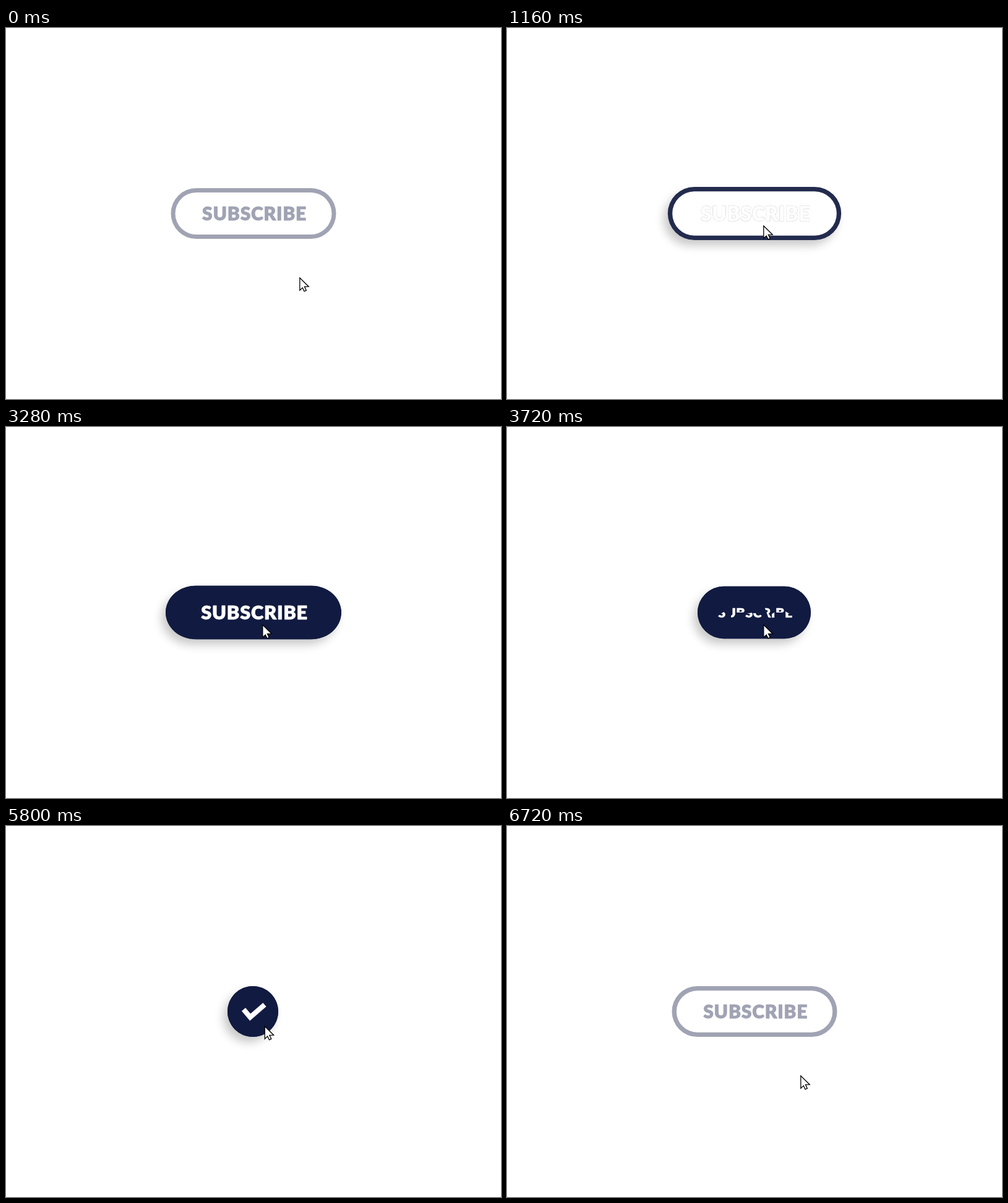
An HTML page with a canvas for the animation above (8640 ms loop, 800 px wide and 600 px high).

```html
<!DOCTYPE html>
<html lang="en">
<head>
<meta charset="utf-8">
<title>Subscribe button</title>
<style>
  html, body { margin: 0; width: 100%; height: 100%; overflow: hidden; background: #fff; }
  canvas { display: block; }
</style>
</head>
<body>
<canvas id="stage" width="800" height="600"></canvas>
<script>
const ctx = document.getElementById('stage').getContext('2d');
const LOOP = 8640, STEP = 40;
const NAVY = [17, 26, 64];
const LABEL = 'SUBSCRIBE';
const FONT = '900 30px Lato, sans-serif';
const SPACING = 0.8;
// Direction, in degrees, in which the remaining part of each letter lies
const CUTS = [55, 0, -90, 80, 90, -20, 60, -90, 120];
const HOME = [474, 403], TARGET = [414, 319];

const mix = (a, b, k) => a + (b - a) * k;
const ramp = (t, from, to) => Math.min(1, Math.max(0, (t - from) / (to - from)));
const tone = k => `rgb(${NAVY.map(v => Math.round(mix(255, v, k))).join()})`;

function polygon(points) {
  ctx.beginPath();
  points.forEach(([x, y]) => ctx.lineTo(x, y));
  ctx.closePath();
}

function pill(cx, hw, hh, rx) {
  const flat = hw - rx;
  ctx.moveTo(cx + flat, 300 + hh);
  ctx.ellipse(cx + flat, 300, rx, hh, 0, Math.PI / 2, -Math.PI / 2, true);
  ctx.ellipse(cx - flat, 300, rx, hh, 0, -Math.PI / 2, Math.PI / 2, true);
  ctx.closePath();
}

// The first part of the outline, counterclockwise from the lower right
function trimmedPill(cx, hw, hh, rx, part) {
  const flat = hw - rx, arc = Math.PI * (rx + hh) / 2;
  const total = 2 * (arc + 2 * flat), points = [];
  for (let i = 0; i <= 240; i++) {
    let d = total * part * i / 240, side = 1;
    if (d > total / 2) { d -= total / 2; side = -1; }
    const a = Math.PI / 2 - Math.PI * Math.min(1, d / arc);
    const x = flat + rx * Math.cos(a) - Math.max(0, d - arc);
    points.push([cx + side * x, 300 + side * hh * Math.sin(a)]);
  }
  polygon(points);
}

function drawLabel(x, scale, color, weight, trim = 0) {
  ctx.save();
  ctx.translate(x, 300.6);
  ctx.scale(scale, scale);
  ctx.font = FONT;
  ctx.fillStyle = ctx.strokeStyle = color;
  ctx.lineWidth = weight;
  ctx.lineJoin = 'round';
  const full = ctx.measureText(LABEL).width + SPACING * (LABEL.length - 1);
  [...LABEL].forEach((letter, i) => {
    const w = ctx.measureText(letter).width;
    const left = ctx.measureText(LABEL.slice(0, i + 1)).width - w + SPACING * i - full / 2;
    ctx.save();
    if (trim > 0) {
      const angle = CUTS[i] * Math.PI / 180;
      ctx.translate(left + w / 2, 0);
      ctx.rotate(angle);
      ctx.beginPath();
      ctx.rect(mix(-16, 16, trim), -40, 80, 80);
      ctx.rotate(-angle);
      ctx.translate(-left - w / 2, 0);
      ctx.clip();
    }
    ctx.fillText(letter, left, 10.6);
    ctx.strokeText(letter, left, 10.6);
    ctx.restore();
  });
  ctx.restore();
}

function drawCheck(part) {
  const bend = 0.34;
  const first = Math.min(1, part / bend), second = ramp(part, bend, 1);
  ctx.beginPath();
  ctx.moveTo(384, 296.6);
  ctx.lineTo(mix(384, 394.6, first), mix(296.6, 309.2, first));
  if (second > 0) ctx.lineTo(mix(394.6, 418, second), mix(309.2, 289, second));
  ctx.strokeStyle = '#fff';
  ctx.lineWidth = 8;
  ctx.lineJoin = 'miter';
  ctx.stroke();
}

function drawCursor(t) {
  const leaving = t >= 5760;
  const u = leaving ? ramp(t, 5760, 6680) : ramp(t, 0, 1040);
  const [from, to] = leaving ? [TARGET, HOME] : [HOME, TARGET];
  const x = mix(from[0], to[0], 1 - (1 - u) ** 1.33);
  const y = mix(from[1], to[1], 1 - (1 - u) ** 1.1);
  ctx.save();
  ctx.translate(x, y);
  polygon([[0.8, 1], [0.8, 21.3], [5.2, 17], [8, 22.8], [11.3, 21.4], [8.4, 15.3], [15.2, 15.2]]);
  ctx.fillStyle = '#fff';
  ctx.fill();
  ctx.strokeStyle = '#000';
  ctx.lineWidth = 1.3;
  ctx.lineJoin = 'miter';
  ctx.stroke();
  ctx.restore();
}

function draw(t) {
  const hover = ramp(t, 880, 1160);
  const widen = ramp(t, 1160, 1760);
  const filled = ramp(t, 1120, 1920) ** 2.2;
  const shrink = ramp(t, 3240, 4160);
  const reset = ramp(t, 6440, 6720);
  const scale = 1 + 0.05 * hover;

  const hw = mix(mix(133.5 * scale + 6.3 * widen, 41, shrink), 133.5, reset);
  const hh = mix(41 * scale + 0.4 * widen, 41, shrink);
  const rx = Math.min(hw, mix(41 * scale + 6.4 * widen, 41, Math.min(1, shrink * 1.6)));
  const cx = 400 - shrink + reset;
  const ink = mix(mix(0.4, 1, ramp(t, 880, 1200)), 0.4, reset);

  ctx.fillStyle = '#fff';
  ctx.fillRect(0, 0, 800, 600);

  ctx.save();
  ctx.shadowColor = `rgba(0,0,0,${0.22 * hover * (1 - reset)})`;
  ctx.shadowOffsetX = -7;
  ctx.shadowOffsetY = 9;
  ctx.shadowBlur = 15;
  ctx.beginPath();
  pill(cx, hw - 0.5, hh - 0.5, rx - 0.5);
  ctx.fill();
  ctx.restore();

  if (filled > 0 && reset < 1) {
    trimmedPill(cx, hw, hh, rx, filled);
    ctx.fillStyle = tone(1 - reset);
    ctx.fill();
  }

  const border = 7 * scale;
  ctx.beginPath();
  pill(cx, hw, hh, rx);
  pill(cx, hw - border, hh - border, rx - border);
  ctx.fillStyle = tone(ink);
  ctx.fill('evenodd');

  if (reset > 0) {
    ctx.globalAlpha = reset;
    drawLabel(401.3, mix(0.6, 1, reset), tone(0.4), 0.8);
    ctx.globalAlpha = 1;
  } else if (shrink < 1) {
    if (hover > 0 && filled < 1) drawLabel(401.2, scale, tone(0.4 * (1 - filled)), 1.1);
    drawLabel(401.2, mix(scale, 0.404, shrink), tone(0.4 * (1 - hover)), 0.8, shrink);
  }

  const check = ramp(t, 4120, 4240);
  if (check > 0 && reset < 0.5) {
    ctx.globalAlpha = 1 - 2 * reset;
    drawCheck(check);
    ctx.globalAlpha = 1;
  }

  drawCursor(t);
}

const start = performance.now();
function tick() {
  const t = (performance.now() - start) % LOOP;
  draw(Math.floor(t / STEP) * STEP);
  requestAnimationFrame(tick);
}
tick();
</script>
</body>
</html>
```
